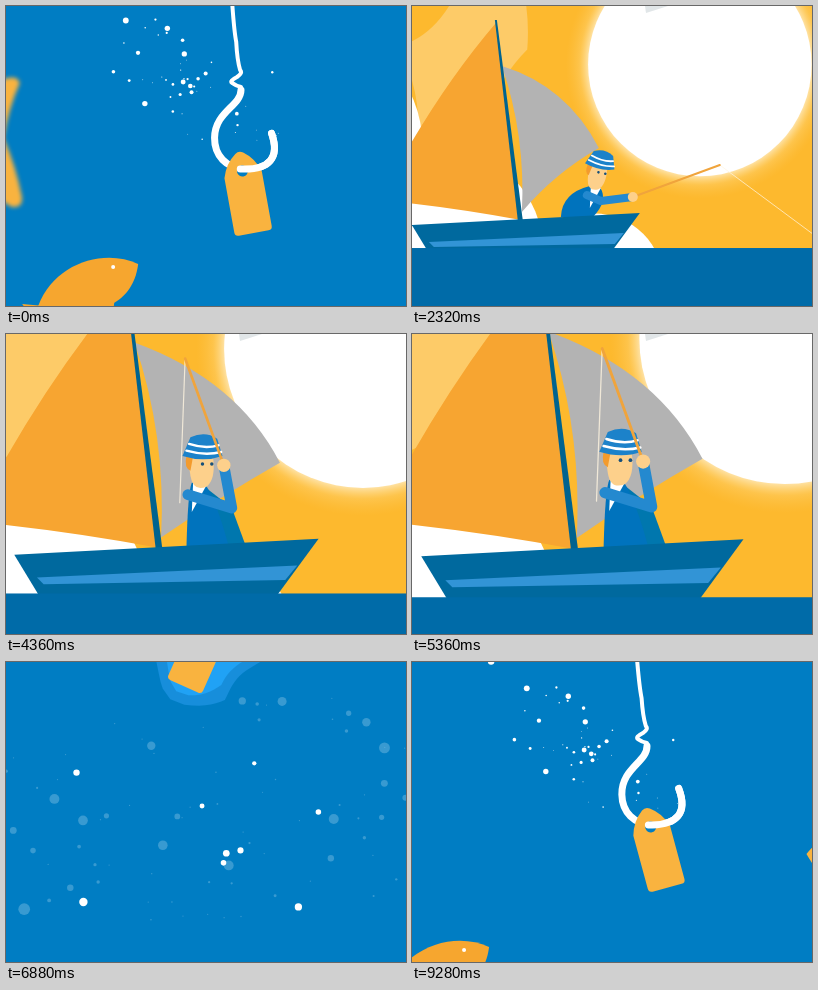
Write an HTML page with a canvas that moves like this. It is 400 px wide and 300 px high and loops after 9.32 s.

```html
<!DOCTYPE html>
<html lang="en">
<head>
<meta charset="utf-8">
<title>Fishing at sunset</title>
<style>
  html, body { margin: 0; height: 100%; overflow: hidden; background: #007dc3; }
  canvas { display: block; width: 100vw; height: 100vh; }
</style>
</head>
<body>
<canvas width="400" height="300"></canvas>
<script>
const ctx = document.querySelector('canvas').getContext('2d');
const LOOP = 9320, SURFACE_START = 400, WIDE_CUT = 5600, DIVE = 6480;
// The opening continues the underwater shot at this clip time.
const OPENING = 9640;

const clamp = v => Math.max(0, Math.min(1, v));
const lerp = (a, b, u) => a + (b - a) * u;
const progress = (t, from, to) => clamp((t - from) / (to - from));
function ease(t, from, to) {
  const u = progress(t, from, to);
  return u * u * (3 - 2 * u);
}
function randomSource(seed) {
  return () => (seed = seed * 16807 % 2147483647) / 2147483647;
}

function fill(path, color) {
  ctx.fillStyle = color;
  ctx.fill(new Path2D(path));
}
function stroke(path, color, width) {
  ctx.strokeStyle = color;
  ctx.lineWidth = width;
  ctx.stroke(new Path2D(path));
}
function circle(x, y, r, color) {
  ctx.fillStyle = color;
  ctx.beginPath();
  ctx.arc(x, y, r, 0, 7);
  ctx.fill();
}
function at(x, y, scale, degrees, draw) {
  ctx.save();
  ctx.translate(x, y);
  ctx.scale(scale, scale);
  ctx.rotate(degrees * Math.PI / 180);
  draw();
  ctx.restore();
}
function background(color, top = 0) {
  ctx.fillStyle = color;
  ctx.fillRect(0, top, 400, 300);
}

// Above the water

const fishing = {
  head: [185, 169], tilt: [12], hips: [168, 211], coat: [182, 208], elbow: [189, 195],
  hand: [221, 191], tip: [308, 159], line: [420, 242], sail: [187, 142], lift: [0]
};
const raised = {
  head: [140, 154], tilt: [0], hips: [148, 214], coat: [174, 214], elbow: [163, 184],
  hand: [157, 152], tip: [128, 72], line: [124, 180], sail: [199, 150], lift: [-6]
};
const hauling = {
  ...fishing, head: [157, 155], tilt: [0], hips: [150, 211], coat: [168, 208], elbow: [170, 190],
  hand: [192, 183], tip: [246, 104], line: [254, 242]
};
const casting = { ...hauling, tip: [264, 148], line: [448, 240] };

function blend(a, b, u) {
  const pose = {};
  for (const part in a) pose[part] = a[part].map((v, i) => lerp(v, b[part][i], u));
  return pose;
}
function poseAt(t) {
  if (t >= WIDE_CUT) return casting;
  if (t < 2320) return blend(hauling, fishing, ease(t, 900, 1900));
  return blend(fishing, raised, ease(t, 2700, 4200));
}

function drawSun(x, y, r) {
  const glow = ctx.createRadialGradient(x, y, r, x, y, r * 1.2);
  glow.addColorStop(0, 'rgba(255,235,190,.8)');
  glow.addColorStop(.4, 'rgba(255,217,130,.35)');
  glow.addColorStop(1, 'rgba(255,200,90,0)');
  circle(x, y, r * 1.2, glow);
  circle(x, y, r, '#fff');
}

function drawSkyClouds() {
  const pale = '#fdcb68';
  fill('M114 -8Q124 25 117 55Q106 70 95 85Q82 109 62 114Q77 143 73 176Q102 177 116 152Q122 132 138 116Q140 90 132 68L137 50A30 30 0 1 0 122 7Z', pale);
  fill('M259 -14Q260 50 305 64Q304 28 284 -14Z', pale);
  fill('M354 76Q372 110 402 108V145L389 166Q352 150 353 120Z', pale);
}

function drawHead(hat) {
  fill('M-10 -8H9Q11 9 4 14Q-6 18 -8 6Z', '#fdd08b');
  fill('M-11 -9H-6L-8 2Q-13 0 -11 -9Z', '#f39b2d');
  circle(1, -3, 1.3, '#17507a');
  circle(8, -3, 1.3, '#17507a');
  if (!hat) return fill('M-12 -4Q-16 -18 0 -16Q12 -19 10 -7Z', '#f39b2d');
  fill('M-8 -23Q3 -28 12 -22L16 -9Q2 -4 -14 -9Z', '#1c82ca');
  stroke('M-9 -18Q3 -14 13 -17M-11 -13Q3 -9 15 -12', '#fff', 1.8);
}

function drawMan({ head, tilt, hips, coat, elbow, hand, tip, line }, hat) {
  const [x, y] = head, [hx, hy] = hips;
  stroke(`M${tip}L${line}`, 'rgba(255,246,225,.8)', .9);
  fill(`M${x} ${y + 12}L${elbow}L${coat}L${hips}Z`, '#0077ae');
  fill(`M${hx - 19} ${hy}Q${hx - 18} ${y + 18} ${x - 7} ${y + 11}L${x + 3} ${y + 12}Q${x + 12} ${y + 26} ${hx + 13} ${hy}Z`, '#0073bd');
  fill(`M${x - 6} ${y + 11}L${x + 4} ${y + 13}L${x - 7} ${y + 33}Z`, '#fff');
  at(x, y, 1, tilt[0], () => drawHead(hat));
  stroke(`M${hand}L${tip}`, '#f0a43c', 2);
  stroke(`M${x - 10} ${y + 20}L${elbow}L${hand}`, '#2489cf', 8);
  circle(...hand, 5, '#fdd08b');
}

function drawBoat(pose, hat) {
  const [sx, sy] = pose.sail;
  fill('M84 17Q20 92 -32 194Q40 201 109 214Z', '#f7a531');
  fill(`M90 60Q${sx - 32} ${sy - 62} ${sx} ${sy}Q${sx - 44} ${sy + 25} 110 206Q114 130 90 60Z`, '#b3b3b3');
  fill('M83 14H85L111 215H106Z', '#00638f');
  drawMan(pose, hat);
  fill('M0 219L228 207L195 252H20Z', '#00699e');
  fill('M17 236L212 227L203 238L22 241Z', '#3294d6');
}

function drawSurface(t) {
  const wide = t >= WIDE_CUT;
  const zoom = wide ? .39 + (t - 6040) * 5e-6 : .435 + 1.11 * (1 - Math.exp(-Math.max(0, t - 800) / 2140));
  const push = zoom - .435;
  const pan = wide ? 0 : Math.max(0, Math.min(1.22, (t - 2320) / 2040));
  const water = wide ? 248 : 248 - 10.6 * push + 21 * pan;
  const boatScale = Math.max(zoom, .44);
  const pose = poseAt(t);

  background('#fdb92e');
  at(-210 * push, -271 * push, 1 + 1.23 * push, 0, drawSkyClouds);
  drawSun(237 + 90 * push + 39 * pan, 132 - 130 * push, 66 + 81 * push);
  fill('M233 0H256L234 7Z', 'rgba(120,140,150,.22)');
  at(-134 * push + 10 * pan, water, 1 + Math.max(0, push), 0, () => {
    circle(-20, -66, 75, '#fff');
    circle(68, 1, 64, '#fff');
    circle(165, 22, 44, '#fff');
  });
  at(97 - 172 * (boatScale - .435) + 66 * pan, water + (pose.lift[0] - 242) * boatScale, boatScale, 0,
    () => drawBoat(pose, t > 1300));
  if (t > 700 && t < 900) stroke('M121 179Q122 192 132 196M140 202Q144 205 149 204', '#fff', 1.2);
  background('#006ba8', water);
}

// Under the water

function hookAt(s) {
  const sink = progress(s, DIVE, 7920), settle = ease(s, 7920, 8800);
  const sway = Math.sin((s - 9540) / 180);
  return {
    x: lerp(lerp(300, 143, sink), 235, settle),
    y: lerp(lerp(-150, 48, sink), 84, settle),
    angle: lerp(42, sway, settle),
    tagAngle: lerp(24, -12 + 3.2 * sway, settle)
  };
}

// A wavy band that widens away from the sinking hook.
function trailBand(pad, color) {
  ctx.fillStyle = color;
  ctx.beginPath();
  for (const side of [-1, 1]) {
    for (let i = 0; i <= 80; i++) {
      const d = (side < 0 ? i : 80 - i) * 4 - pad;
      const cap = Math.sqrt(clamp((d + pad) / 32));
      const offset = side * cap * (30 + pad + .11 * d + 4 * Math.sin(d / 13 + side));
      ctx.lineTo(57 + .6 * d + .8 * offset, 172 - .8 * d + .6 * offset);
    }
  }
  ctx.fill();
}

function drawTrail({ x, y }, alpha) {
  ctx.globalAlpha = alpha;
  at(x - 143, y - 48, 1, 0, () => {
    trailBand(10, '#178edb');
    trailBand(0, '#20a2f5');
  });
  ctx.globalAlpha = 1;
}

function drawTag() {
  fill('M-4 -17Q0 -20 4 -17Q15 -9 19 5V60Q19 64 15 64H-15Q-19 64 -19 60V5Q-15 -9 -4 -17Z', '#f9b33f');
  circle(0, 1, 5.5, '#007dc3');
}

function drawHook({ x, y, angle, tagAngle }) {
  at(x, y, 1, angle * .5, () =>
    stroke('M-12 -320L-9 -84Q-7 -58 -5 -48Q-4 -30 -1 -20Q2 -17 -4 -13Q-12 -9 -9 -7Q-5 -4 0 -3V1', '#fff', 4));
  at(x, y, 1, angle, () => {
    stroke('M0 0C0 16 -26 22 -26 48C-26 66 -14 78 4 79C28 79 40 68 31 43', '#fff', 7);
    at(2, 80, 1, tagAngle - angle, drawTag);
    stroke('M0 79H4C28 79 40 68 31 43', '#fff', 7);
  });
}

function drawSinkingBubbles(s) {
  const rnd = randomSource(71), drift = (s - 7920) * .03;
  for (let i = 0; i < 75; i++)
    circle(rnd() * 400, rnd() * 230 - drift, .6 + rnd() ** 4 * 6, 'rgba(125,190,226,.45)');
  for (let i = 0; i < 11; i++)
    circle(20 + rnd() * 300, 60 + rnd() * 240 - drift, 2 + rnd() * 2.5, '#fff');
}

// Bubbles scatter along a diagonal, thickest near the line.
function drawRisingBubbles(s) {
  const rnd = randomSource(29), age = s - OPENING;
  for (let i = 0; i < 50; i++) {
    const along = (rnd() + rnd()) / 2, spread = (rnd() + rnd() - 1) * 60;
    const x = 50 + 270 * along + age * .014, y = 150 * along + spread - age * .033;
    circle(x, y, .4 + 3.3 * rnd() ** 2 * (1.2 - along), '#fff');
  }
}

function drawFish(age) {
  at(132 + age * .153, 258 - age * .075, 1, 0, () => {
    const orange = '#f6a62f';
    fill('M-94 42L-116 40Q-108 50 -110 66Z', orange);
    fill('M-31 32L-24 34Q-23 44 -30 60H-36Z', orange);
    fill('M0 0C-34 -16 -84 -1 -100 42C-60 55 -6 50 0 0Z', orange);
    circle(-25, 3, 2, '#fff');
  });
}

function drawNearFish(age) {
  const before = Math.min(age, 0), after = Math.max(age, 0);
  ctx.filter = age > -240 ? 'blur(2px)' : 'none';
  at(-2 - before * 1.94 - after * .25, 132 - before * .167, 1, 0, () =>
    fill('M0 0Q5 -30 16 -55Q14 -62 4 -60Q-24 -52 -40 -10C-100 -90 -250 -60 -300 0C-250 90 -100 80 -40 20Q-22 52 8 69Q20 70 18 58Q12 28 0 0Z', '#f9b33f'));
  ctx.filter = 'none';
}

function drawUnderwater(s) {
  const hook = hookAt(s), calm = progress(s, 8350, 8850);
  background('#007dc3');
  drawTrail(hook, 1 - progress(s, 8100, 8550));
  drawHook(hook);
  ctx.globalAlpha = 1 - calm;
  drawSinkingBubbles(s);
  ctx.globalAlpha = calm;
  drawRisingBubbles(s);
  ctx.globalAlpha = 1;
  if (s > 9000) {
    drawFish(s - OPENING);
    drawNearFish(s - OPENING);
  }
}

ctx.lineCap = ctx.lineJoin = 'round';
const start = performance.now();
function frame() {
  const t = (performance.now() - start) % LOOP;
  if (t < SURFACE_START) drawUnderwater(t + OPENING);
  else if (t < DIVE) drawSurface(t);
  else drawUnderwater(t);
  requestAnimationFrame(frame);
}
frame();
</script>
</body>
</html>
```
